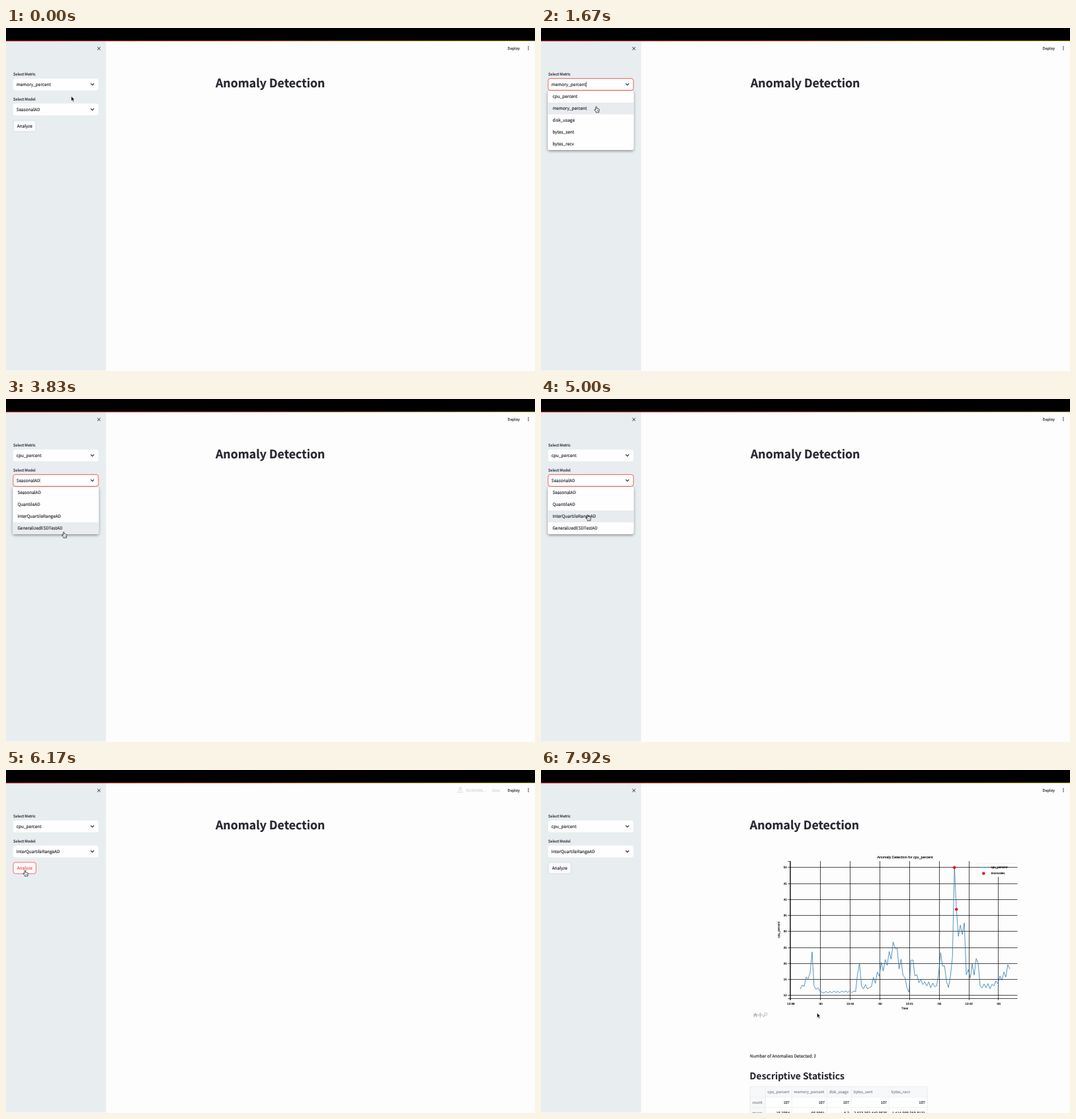
Recreate the animation shown at these times as an HTML page. Size 800 by 520 pixels, loop 8000 ms.

```html
<!DOCTYPE html>
<html lang="en">
<head>
<meta charset="utf-8">
<title>Anomaly Detection</title>
<style>
  html, body { margin: 0; width: 100%; height: 100%; overflow: hidden; background: #fdfdfd; }
  svg { display: block; width: 100vw; height: 100vh; }
  text {
    font-family: "Noto Sans CJK JP", "Noto Sans CJK SC", "Noto Sans CJK KR", "Noto Sans CJK", "Open Sans", sans-serif;
    font-size: 6.45px; color: #262730; fill: currentColor; stroke: currentColor; stroke-width: .16px;
    text-rendering: geometricPrecision;
  }
  .small { font-size: 5.64px; }
  .title { font-size: 17.7px; font-weight: 700; stroke-width: .2px; }
  .head { font-size: 13.95px; font-weight: 600; stroke-width: .1px; }
  .muted { color: #85878f; }
  .mid { text-anchor: middle; }
  .end { text-anchor: end; }
  .plot text { font-family: "Liberation Sans", Arial, sans-serif; font-size: 4.5px; color: #000; stroke-width: .14px; }
  .plot .caption { font-size: 5.4px; }
</style>
</head>
<body>
<svg id="stage" viewBox="0 0 800 520" preserveAspectRatio="none"></svg>
<script>
const LOOP = 8000;
const RED = '#ff4b4b';
const BLUE = '#1f70aa';

// moments of the session, in ms
const OPEN_METRIC = 660, PICK_METRIC = 2420;
const OPEN_MODEL = 3280, PICK_MODEL = 5120;
const RUN = 6000, RESULT = 6550, TOOLS = 7480;

const METRICS = ['cpu_percent', 'memory_percent', 'disk_usage', 'bytes_sent', 'bytes_recv'];
const MODELS = ['SeasonalAD', 'QuantileAD', 'InterQuartileRangeAD', 'GeneralizedESDTestAD'];
const ROW = 18, METRIC_Y = 76.5, MODEL_Y = 114.5;

// where the pointer heads: start time, x, y; longer ways take longer
const HOME = [98.7, 103.4];
const MOVES = [
  [80, 86, 69.5], [500, 84, 85], [750, 82, 172], [1330, 83.5, 119], [1750, 82, 103],
  [2460, 97, 121.3], [3350, 87.3, 201.5], [4170, 70.8, 175.5], [5000, 71.5, 188],
  [5420, 28.7, 152], [6300, 202, 250], [7250, 417.4, 368.2]
];

// turning points of the cpu load: sample index, percent
const TURNS = [
  [0, 12], [5, 17], [6, 23.6], [7, 13], [11, 11], [28, 11.2], [30, 20], [31, 13], [35, 12.5],
  [48, 24.7], [55, 11], [56, 21], [60, 14], [69, 13], [71, 23.4], [75, 12.5], [77, 22],
  [78, 50], [79, 37], [80, 28.5], [83, 32.7], [84, 16.5], [90, 20], [91, 13], [98, 13], [106, 18.3]
];

const clamp = v => Math.max(0, Math.min(1, v));
const ramp = (t, a, b) => clamp((t - a) / (b - a));
const snap = v => Math.floor(v) + .5;

function randomFrom(seed) {
  return () => (seed = seed * 16807 % 2147483647) / 2147483647;
}

// straight runs between turning points, with a zigzag that grows with the load
function loadCurve() {
  const random = randomFrom(7), values = [TURNS[0][1]];
  for (let k = 1; k < TURNS.length; k++) {
    const [i0, v0] = TURNS[k - 1], [i1, v1] = TURNS[k];
    for (let i = i0 + 1; i < i1; i++) {
      const v = v0 + (v1 - v0) * (i - i0) / (i1 - i0);
      const zig = (i % 2 ? 1 : -1) * (.4 + random()) * (Math.min(v, 20) - 10) * .22;
      values.push(v + zig);
    }
    values.push(v1);
  }
  return values;
}

const text = (x, y, s, cls = '', extra = '') => `<text x="${x}" y="${y}" class="${cls}" ${extra}>${s}</text>`;
const rect = (x, y, w, h, extra) => `<rect x="${x}" y="${y}" width="${w}" height="${h}" ${extra}/>`;
const path = (d, color, width, extra = '') =>
  `<path d="${d}" fill="none" stroke="${color}" stroke-width="${width}" ${extra}/>`;

function select(id, label, y) {
  return text(11, y - 5, label, 'small') +
    rect(10.8, y, 129, 18, `id="${id}Box" rx="3.4" fill="#fefefe" stroke="none" stroke-width=".9"`) +
    text(15.8, y + 11.5, '', '', `id="${id}Text"`) +
    path('M0 0v8.6', '#262730', .7, `id="${id}Caret"`) +
    path(`M128.4 ${y + 7.9}l2.2 2.2l2.2 -2.2`, '#262730', 1.1, 'stroke-linecap="round"');
}

function menu(id, items, y) {
  return `<g id="${id}Menu">` +
    rect(10.4, y, 129.8, items.length * ROW, 'rx="3" fill="#fefefe" filter="url(#shadow)"') +
    rect(10.4, y, 129.8, ROW, `id="${id}Hover" fill="#e8ecef"`) +
    items.map((s, i) => text(17.4, y + i * ROW + 11.2, s)).join('') + '</g>';
}

const plotX = i => 392 + i * 2.99;
const plotY = v => 341.8 - (v - 10) * 4.85;

function plot() {
  let vertical = '', horizontal = '', labels = '';
  for (let i = 0; i < 8; i++) {
    const x = 377.8 + i * 44.87;
    vertical += `M${snap(x)} 138V349`;
    labels += text(x, 355.8, i % 2 ? ':30' : `12:${39 + i / 2}`, 'mid');
  }
  for (let v = 10; v <= 50; v += 5) {
    horizontal += `M373.5 ${snap(plotY(v))}H720.5`;
    labels += text(371.8, plotY(v) + 1.6, v, 'end');
  }
  const load = loadCurve();
  const line = 'M' + load.map((v, i) => `${plotX(i).toFixed(2)} ${plotY(v).toFixed(2)}`).join('L');
  const dot = (x, y) => `<circle cx="${x}" cy="${y}" r="2.1" fill="#f00" stroke="#b00" stroke-width=".3"/>`;
  const peak = load.indexOf(Math.max(...load));
  return '<g class="plot">' +
    path(vertical, '#000', .7) +
    rect(660, 137.5, 60.5, 24.5, 'fill="#fdfdfd"') +
    path('M660 162V141.5H720', '#ddd', .4) +
    path(horizontal, '#000', .7) +
    path('M373.5 138.5H376.5V346.5H373.5M376.5 349V346.5H720.5', '#000', .7) +
    path(line, BLUE, .75, 'stroke-linejoin="round"') +
    dot(plotX(peak), plotY(load[peak])) + dot(plotX(peak + 1), plotY(load[peak + 1]) + .4) +
    path('M663 147.5h12.5', BLUE, 1.1) + dot(669.3, 156.8) +
    text(680.4, 148.9, 'cpu_percent') + text(680.4, 158.4, 'Anomalies') + labels +
    text(550.5, 134.4, 'Anomaly Detection for cpu_percent', 'mid caption') +
    text(550, 363, 'Time', 'mid') +
    text(0, 0, 'cpu_percent', 'mid', 'transform="translate(361.4 242.3) rotate(-90)"') + '</g>';
}

function table() {
  const edges = [316, 339.4, 379.4, 432.5, 469.5, 526.6, 584.3];
  const rows = [
    ['count', ...METRICS.map(() => '107')],
    ['mean', '16.7084', '66.0981', '5.2', '2,573,362,443.9626', '1,414,099,259.8131']
  ];
  let out = rect(316, 480, 268.3, 60, 'rx="3" fill="#fefefe"') +
    rect(316, 480, 268.3, 16, 'fill="#f7f8fa"') + rect(316, 480, 23.4, 60, 'fill="#f7f8fa"') +
    path('M316 496H584.3M316 511.8H584.3' + edges.slice(1, 6).map(x => `M${x} 480V540`).join(''), '#e3e5e9', .5) +
    rect(316, 480, 268.3, 60, 'rx="3" fill="none" stroke="#dfe1e5" stroke-width=".6"');
  METRICS.forEach((s, i) => out += text(edges[i + 1] + 3.2, 490.2, s, 'small muted'));
  rows.forEach((cells, r) => cells.forEach((s, c) => {
    const y = 506 + r * 15.6;
    out += c ? text(edges[c + 1] - 3.4, y, s, 'small end') : text(319.6, y, s, 'small muted');
  }));
  return out;
}

const toolbar = `<g id="tools" fill="#bdbdbd">
  <path d="M320.6 371.6l3.6 -3.3l3.6 3.3h-1v2.9h-1.8v-2h-1.6v2h-1.8v-2.9z"/>
  <g fill="none" stroke="#bdbdbd"><path d="M331.5 367.6v7.6M327.8 371.4h7.4" stroke-width="1.2"/>
  <circle cx="340" cy="370.2" r="2.1" stroke-width=".9"/>
  <path d="M338.4 371.8l-2.6 2.7" stroke-width="1.4"/></g></g>`;

const running = `<g id="running">
  <g fill="none" stroke="#7d808a" stroke-width=".9" stroke-linecap="round">
  <path d="M682.6 33.6h8.4M684 31.2l2.7 -1.6l2.6 1.6M684.2 27l2.5 2.4l3 -2.6"/><circle cx="686.8" cy="26.7" r=".7"/></g>
  ${text(695.8, 32.6, 'RUNNING...', 'small muted')}${text(735, 32.6, 'Stop', 'small muted')}</g>`;

const cursors = `<g id="arrow"><path d="M0 0V7.4L1.7 5.9L2.9 8.7L4.2 8.1L3 5.4H5.2Z" fill="#000" stroke="#fff" stroke-width=".6"/></g>
  <g id="beam"><path d="M-1.7 -3.6Q0 -3.6 0 -2.6Q0 -3.6 1.7 -3.6M0 -2.8V2.8M-1.7 3.6Q0 3.6 0 2.6Q0 3.6 1.7 3.6" fill="none" stroke="#222" stroke-width=".8"/></g>
  <g id="hand"><path d="M-.8 .7Q0 -.5 .8 .7V3.2Q1.7 2.6 2.3 3.4Q3.2 2.9 3.6 3.8Q4.8 3.6 4.7 5L4.1 7.3V9H-.4V8L-2.9 5Q-2.6 3.8 -.8 5.2Z" fill="#fff" stroke="#111" stroke-width=".75" stroke-linejoin="round"/>
  <path d="M.9 5.4v2M2.1 5.4v2M3.2 5.4v2" stroke="#111" stroke-width=".4"/></g>`;

document.getElementById('stage').innerHTML = `
  <defs>
    <linearGradient id="strip"><stop offset="0" stop-color="#ff4b4b"/><stop offset=".5" stop-color="#ff9c62"/><stop offset="1" stop-color="#f8f86a"/></linearGradient>
    <filter id="shadow" x="-10%" y="-15%" width="120%" height="130%"><feDropShadow dx="0" dy="1.4" stdDeviation="2" flood-color="#000" flood-opacity=".45"/></filter>
  </defs>` +
  rect(0, 0, 800, 520, 'fill="#fdfdfd"') +
  rect(0, 19, 151.3, 500.3, 'fill="#e8edf0"') +
  rect(0, 19, 800, 1.3, 'fill="url(#strip)"') +
  rect(0, 0, 800, 19.4, 'fill="#000"') +
  path('M138.2 28.8l4.6 4.6M142.8 28.8l-4.6 4.6', '#262730', 1) +
  text(758.6, 32.6, 'Deploy', 'small') +
  [28.2, 30.5, 32.8].map(y => `<circle cx="790" cy="${y}" r=".8" fill="#262730"/>`).join('') +
  running +
  text(317, 90.4, 'Anomaly Detection', 'title', 'id="title"') +
  '<g id="result">' + plot() + toolbar +
  text(316, 435.7, 'Number of Anomalies Detected: 2') +
  text(315.6, 468.9, 'Descriptive Statistics', 'head') + table() + '</g>' +
  select('metric', 'Select Metric', METRIC_Y) +
  select('model', 'Select Model', MODEL_Y) +
  rect(11, 140, 34.4, 17.2, 'id="button" rx="3.4" fill="#f9fafb" stroke-width=".8"') +
  text(28.2, 150.9, 'Analyze', 'mid', 'id="buttonText"') +
  menu('metric', METRICS, 95) + menu('model', MODELS, 133) + cursors;

const el = {};
document.querySelectorAll('#stage [id]').forEach(n => el[n.id] = n);
const show = (n, on) => n.setAttribute('visibility', on ? 'visible' : 'hidden');

function pointerAt(t) {
  let [x, y] = HOME;
  for (const [start, toX, toY] of MOVES) {
    if (t < start) break;
    const time = 120 + 2 * Math.hypot(toX - x, toY - y);
    const p = ramp(t, start, start + time), k = p * p * (3 - 2 * p);
    x += (toX - x) * k;
    y += (toY - y) * k;
  }
  return [x, y];
}

function caretAlpha(age) {
  const p = age % 1000;
  return Math.max(1 - ramp(p, 460, 600), ramp(p, 900, 1000));
}

function drawSelect(id, y, value, focused, age) {
  el[id + 'Text'].textContent = value;
  el[id + 'Box'].setAttribute('stroke', focused ? RED : 'none');
  const x = 16.3 + el[id + 'Text'].getComputedTextLength();
  el[id + 'Caret'].setAttribute('transform', `translate(${x} ${y + 4.7})`);
  el[id + 'Caret'].setAttribute('opacity', focused ? caretAlpha(age) : 0);
}

function drawMenu(id, top, count, open, y, selected) {
  show(el[id + 'Menu'], open);
  const row = Math.floor((y - top) / ROW);
  const over = row >= 0 && row < count;
  el[id + 'Hover'].setAttribute('y', top + ROW * (over ? row : selected));
  return open && over;
}

function draw(t) {
  const [x, y] = pointerAt(t);
  const metricOpen = t >= OPEN_METRIC && t < PICK_METRIC;
  const modelOpen = t >= OPEN_MODEL && t < PICK_MODEL;
  drawSelect('metric', METRIC_Y, METRICS[t < PICK_METRIC ? 1 : 0], t >= OPEN_METRIC && t < OPEN_MODEL,
    t - (metricOpen ? OPEN_METRIC : PICK_METRIC));
  drawSelect('model', MODEL_Y, MODELS[t < PICK_MODEL ? 0 : 2], t >= OPEN_MODEL && t < PICK_MODEL + 500,
    t - (modelOpen ? OPEN_MODEL : PICK_MODEL));
  const onMetric = drawMenu('metric', 95, METRICS.length, metricOpen, y, 1);
  const onModel = drawMenu('model', 133, MODELS.length, modelOpen, y, 0);

  const onButton = !metricOpen && !modelOpen && x > 11 && x < 45.4 && y > 140 && y < 157;
  el.button.setAttribute('stroke', onButton ? RED : '#d3d6da');
  el.buttonText.style.color = onButton ? RED : '';

  const done = t >= RESULT;
  show(el.result, done);
  el.title.setAttribute('x', done ? 315.8 : 317);
  el.running.setAttribute('opacity', done ? 0 : ramp(t, RUN, RUN + 500));
  const tools = ramp(t, TOOLS, TOOLS + 200);
  el.tools.setAttribute('opacity', tools);
  el.tools.setAttribute('transform', `translate(0 ${(1 - tools) * 6})`);

  const inBox = top => x > 11 && x < 125 && y > top && y < top + 18;
  const kind = onMetric || onModel || onButton ? 'hand'
    : inBox(METRIC_Y) || (!metricOpen && t > PICK_METRIC && inBox(MODEL_Y)) ? 'beam' : 'arrow';
  for (const name of ['arrow', 'beam', 'hand']) {
    show(el[name], name === kind);
    el[name].setAttribute('transform', `translate(${x} ${y})`);
  }
}

const start = performance.now();
function tick(now) {
  draw(Math.max(0, now - start) % LOOP);
  requestAnimationFrame(tick);
}
draw(0);
requestAnimationFrame(tick);
</script>
</body>
</html>
```
